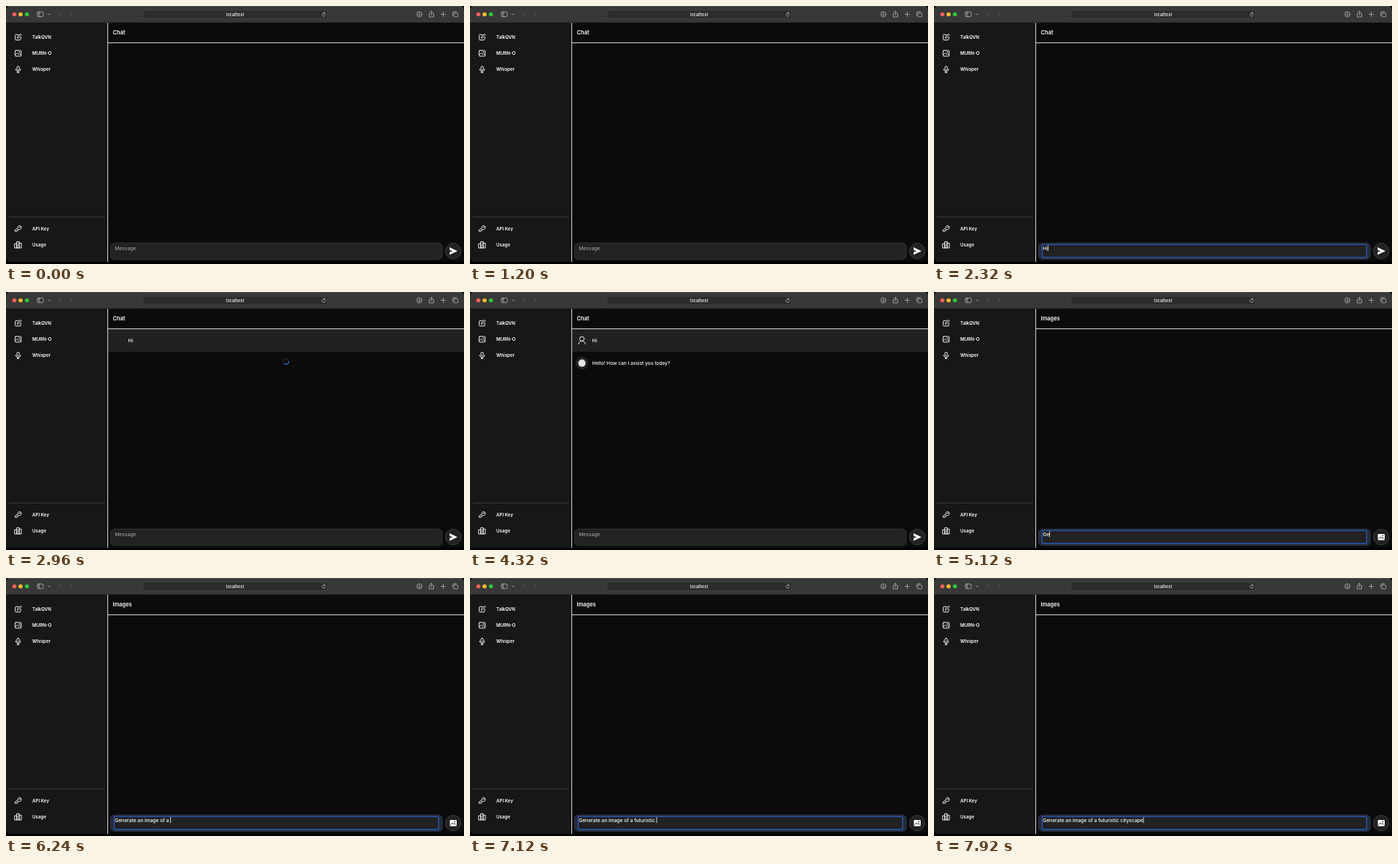
An HTML page for the animation above (8000 ms loop, 628 by 354 pixels).

```html
<!DOCTYPE html>
<html lang="en">
<head>
<meta charset="utf-8">
<title>Chat demo</title>
<style>
  html, body { margin: 0; width: 100%; height: 100%; overflow: hidden; background: #000; }
  svg { display: block; width: 100vw; height: 100vh; }
  text { font: 500 6.7px Inter, "Open Sans", sans-serif; fill: #fff; white-space: pre; }
  .menu text { font-size: 6.2px; font-weight: 600; }
  .line { fill: none; stroke: #f2f2f2; stroke-width: 1; stroke-linecap: round; stroke-linejoin: round; }
  .tool { stroke: #b4b4b4; stroke-width: .8; }
  .dim { stroke: #626262; }
</style>
</head>
<body>
<svg viewBox="0 0 628 354">
  <defs>
    <clipPath id="window"><rect width="628" height="351" rx="5"/></clipPath>
  </defs>

  <g clip-path="url(#window)">
    <rect width="628" height="351" fill="#0b0b0b"/>
    <rect y="23" width="139" height="328" fill="#171717"/>
    <rect width="628" height="23" fill="#383838"/>
    <rect width="628" height=".7" fill="#5a5a5a"/>
    <rect y="22.4" width="628" height=".6" fill="#222"/>
  </g>

  <!-- Browser toolbar -->
  <circle cx="11.5" cy="11.5" r="2.8" fill="#fe5f57"/>
  <circle cx="20" cy="11.5" r="2.8" fill="#febc2e"/>
  <circle cx="28.7" cy="11.5" r="2.8" fill="#28c840"/>
  <rect x="187.5" y="5.8" width="253.5" height="11.4" rx="3" fill="#2c2c2c" stroke="#4b4b4b" stroke-width=".6"/>
  <text x="314.2" y="13.6" text-anchor="middle" style="font-size:5.6px">localhost</text>
  <g class="line tool">
    <rect x="43" y="8.2" width="8" height="6.4" rx="1.2"/>
    <path d="M45.8 8.2v6.4M44 10h.7M44 11.4h.7M57.7 10.8l1.4 1.4 1.4-1.4"/>
    <path class="dim" d="M74.8 8.6l-2.7 2.8 2.7 2.8M87.7 8.6l2.7 2.8-2.7 2.8"/>
    <path d="M437.6 10.4a2.3 2.3 0 1 0 .5 1.6M436 8.2l1.4 1.3-1.5 1.2"/>
    <circle cx="566.8" cy="11.4" r="3.6"/>
    <path d="M566.8 9.5v3.5M565.4 11.8l1.4 1.4 1.4-1.4"/>
    <path d="M581.8 10.2h-1.5v4.8h6v-4.8h-1.5M583.3 12.3V7.2M581.8 8.6l1.5-1.5 1.5 1.5"/>
    <path d="M596.5 11.4h6M599.5 8.4v6"/>
    <rect x="614" y="9.6" width="5.6" height="5.2" rx="1.1"/>
    <path d="M612.4 12.8v-3.7q0-1.3 1.3-1.3h4"/>
  </g>

  <!-- Sidebar -->
  <g class="menu">
    <text x="36" y="45">TalkQVN</text>
    <text x="36" y="67.2">MURN-O</text>
    <text x="36" y="89.4">Whisper</text>
    <text x="36" y="308">API Key</text>
    <text x="36" y="330.2">Usage</text>
  </g>
  <g class="line">
    <path d="M17 39.3h-3.4q-1 0-1 1v5.4q0 1 1 1h5.6q1 0 1-1v-3M15.6 43.8l.4-1.8 3.8-3.8 1.4 1.4-3.8 3.8z"/>
    <rect x="12.4" y="61" width="8.4" height="7.8" rx="1"/>
    <path d="M12.7 67l2.6-2.5 2 2 1.2-1.1 2.1 1.9"/>
    <circle cx="18.2" cy="63.3" r=".5"/>
    <rect x="15" y="82.6" width="3.2" height="5.4" rx="1.6"/>
    <path d="M13.2 86.5a3.4 3.2 0 0 0 6.8 0M16.6 89.8v1.6M15.2 91.4h2.8"/>
    <path d="M16 304.6a2.6 2.6 0 1 1 1.6 1.8l-1 .1v1.3h-1.4v1.3h-2.8v-1.5z"/>
    <circle cx="18.8" cy="303.3" r=".5"/>
    <path d="M12.2 326.2h2.9v5.8h-2.9zM15.1 323.4h3v8.6h-3zM18.1 325.3H21v6.7h-2.9z"/>
  </g>
  <path d="M4 289.5h132" stroke="#444" stroke-width=".8"/>

  <!-- Main pane -->
  <path d="M139.5 23v328M139.5 50.5H628" stroke="#d8d8d8" stroke-width="1"/>
  <text id="title" x="146.6" y="39.4" style="font-size:7.4px;font-weight:600"></text>

  <g id="question">
    <rect x="140" y="51" width="488" height="31" fill="#212121"/>
    <text x="167.6" y="68.8">Hi</text>
    <g id="person" class="line">
      <circle cx="153.5" cy="64.3" r="3.1"/>
      <path d="M148.8 71.4q.6-4 4.7-4t4.7 4"/>
    </g>
  </g>
  <g id="spinner" fill="none" stroke-width="1.1">
    <circle cx="384" cy="95.3" r="3.9" stroke="#232a38"/>
    <path d="M387.9 95.3A3.9 3.9 0 0 1 381.3 98.1" stroke="#3478e0"/>
  </g>
  <g id="answer">
    <circle cx="153.5" cy="97.6" r="8.6" fill="#242424"/>
    <circle cx="153.5" cy="97.6" r="5" fill="#e4e4e4"/>
    <text x="167.6" y="100.2" style="font-size:6.55px">Hello! How can I assist you today?</text>
  </g>

  <!-- Message field -->
  <rect id="field" x="143.4" y="325.2" width="454.8" height="22.4" rx="5.5" stroke-width=".8"/>
  <rect id="focusRing" x="148.4" y="327.4" width="444.8" height="17.6" rx=".8" fill="#222" stroke="#2857b4" stroke-width="1.4"/>
  <text id="message" x="149.2" y="334.7"></text>
  <rect id="caret" y="328.2" width=".8" height="8" fill="#fff"/>

  <circle cx="613.2" cy="336.2" r="10.8" fill="#222" stroke="#414141" stroke-width=".8"/>
  <path id="sendIcon" d="M608 331l11 5.2-11 5.2 .6-4 4-1.2-4-1.2z" fill="#fff"/>
  <g id="imageIcon">
    <rect x="608.6" y="332" width="9.4" height="8.4" rx="1.2" fill="#fff"/>
    <path d="M609.6 338.6l2.6-2.6 1.8 1.8 1.3-1.1 1.8 1.9" fill="none" stroke="#222" stroke-width="1"/>
    <circle cx="615.3" cy="334.4" r=".9" fill="#222"/>
  </g>
</svg>

<script>
const LOOP = 8000;
const GREETING = "Hi";
const PROMPT = "Generate an image of a futuristic cityscape";
const TIMES = {
  focusChat: 1600, send: 2880, person: 3040, answer: 4160,
  images: 4480, focusImages: 4720
};
// [time, characters typed], interpolated linearly
const GREETING_KEYS = [[0, 0], [2080, 0], [2240, 2]];
const PROMPT_KEYS = [[0, 0], [4880, 0], [5120, 2], [6240, 23], [7280, 36], [7360, 36], [7920, 43]];

const el = id => document.getElementById(id);
const show = (id, visible) => { el(id).style.display = visible ? "" : "none"; };

function typedCount(keys, t) {
  const next = keys.findIndex(([time]) => time > t);
  if (next < 0) return keys[keys.length - 1][1];
  const [t0, n0] = keys[next - 1];
  const [t1, n1] = keys[next];
  return Math.floor(n0 + (n1 - n0) * (t - t0) / (t1 - t0) + 1e-6);
}

function draw(t) {
  const images = t >= TIMES.images;
  const sent = t >= TIMES.send && !images;
  const answered = sent && t >= TIMES.answer;
  const focused = images ? t >= TIMES.focusImages : t >= TIMES.focusChat && !sent;

  el("title").textContent = images ? "Images" : "Chat";
  show("question", sent);
  show("person", t >= TIMES.person);
  show("spinner", sent && !answered);
  show("answer", answered);
  show("sendIcon", !images);
  show("imageIcon", images);
  el("spinner").setAttribute("transform", `rotate(${(t - 2960) * 0.45} 384 95.3)`);

  el("field").setAttribute("fill", focused ? "#252b3a" : "#222");
  el("field").setAttribute("stroke", focused ? "#343c50" : "#3c3c3c");
  show("focusRing", focused);
  show("caret", focused);

  const typed = images ? PROMPT.slice(0, typedCount(PROMPT_KEYS, t))
    : sent ? "" : GREETING.slice(0, typedCount(GREETING_KEYS, t));
  const message = el("message");
  message.textContent = typed || "Message";
  message.style.fill = typed ? "#fff" : "#9a9a9a";
  const width = typed ? message.getComputedTextLength() : 0;
  el("caret").setAttribute("x", 149.2 + width);
}

function frame() {
  draw(performance.now() % LOOP);
  requestAnimationFrame(frame);
}
frame();
</script>
</body>
</html>
```
